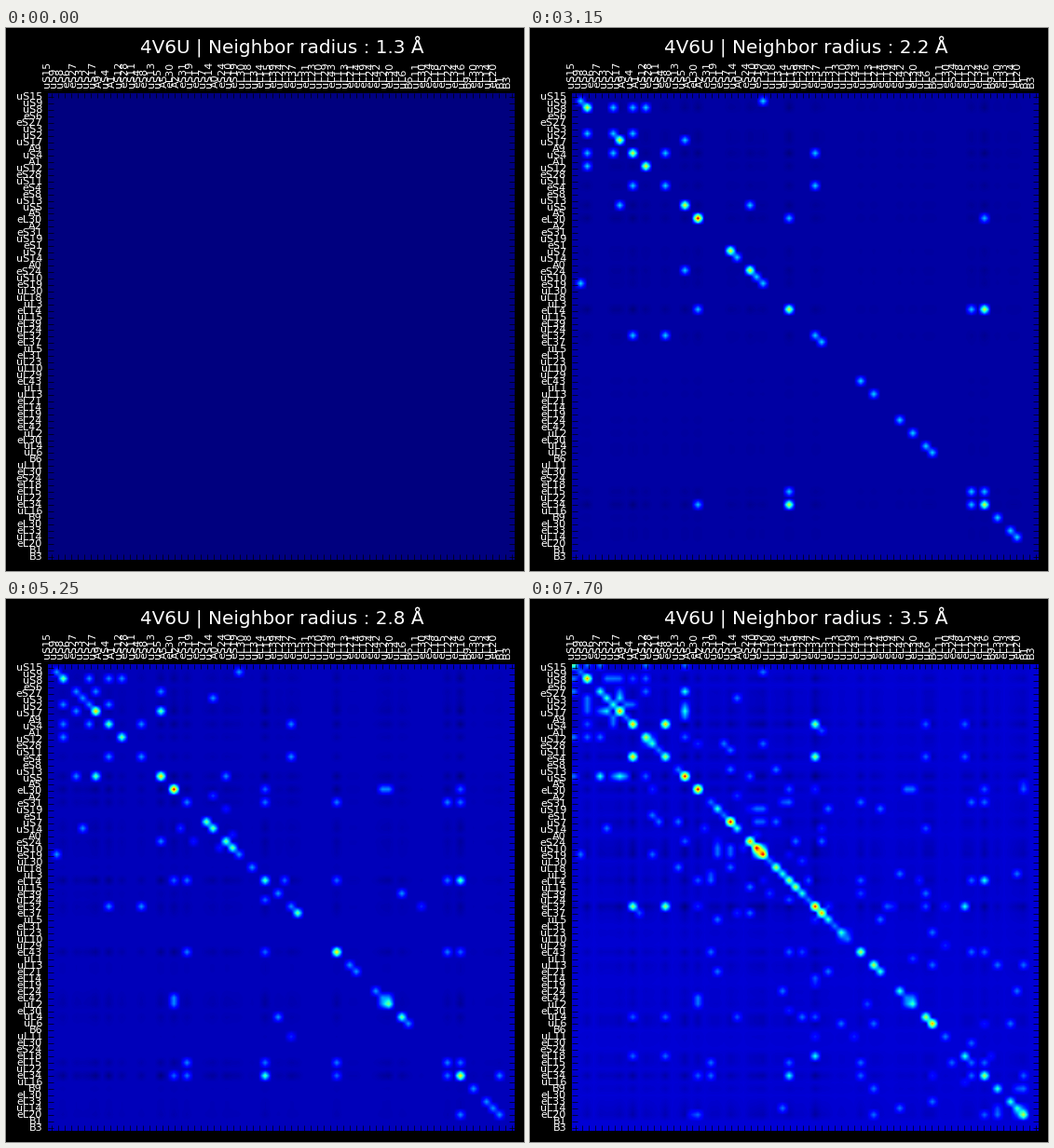
Write a matplotlib script that moves like this. It is 556 px wide and 583 px high and loops after 8000 ms.

```python
import math
import random
import numpy as np
import matplotlib.pyplot as plt
from matplotlib.animation import FuncAnimation

W, H, DPI = 556, 583, 100
LEFT, TOP, SIDE = 45, 70, 501
RIGHT, BOTTOM = LEFT + SIDE, TOP + SIDE
CELL = 6.99
STEPS, HOLD, TICK, LOOP = 23, 350, 50, 8000

plt.rcParams["font.family"] = "DejaVu Sans"

NAMES = """
uS15 uS9 uS8 eS6 eS27 uS3 uS2 uS17 A9 uS4 A1 uS12 eS28 uS11 eS4 eS8 uS13 uS5
A5 eL30 A2 eS31 uS19 eS1 uS7 uS14 A0 eS24 uS10 eS19 uL30 uL18 uL3 eL14 uL15
eL39 uL24 eL32 eL37 uL5 eL31 uL23 uL10 uL29 eL43 uL1 uL13 eL21 eL14 eL19 eL24
eL42 uL2 eL30 uL4 uL6 B6 uL11 eL30 eS24 eL18 eL15 uL22 eL34 uL16 B9 eL30 eL33
uL14 eL20 B1 B3
""".split()
N = len(NAMES)

# Sites where chains meet, by the step of the first contact.
# The other chains of a site join one by one as the radius grows.
SITES = {
    0.9: [19],
    1.8: [(33, 63, 61, 44, 21), 7, 11, 19, 50, 52],
    4.2: [(1, 29), 24, 44, 68],
    5.5: [(2, 6, 9), (14, 37, 9), (17, 7), (27, 17), 24, 55, 65],
    7.5: [(19, 33, 63), (2, 11), 25, 27, 28, 38, 46, 54, 67],
    12.5: [(4, 17, 7), (19, 51, 52), (5, 25), (35, 54), (63, 69),
           28, 31, 38, 44, 47],
    15.2: [(17, 0, 11, 4), (54, 14, 37, 9), (24, 28, 29), (32, 50, 68),
           (46, 69, 65), (17, 6, 8), (2, 5, 7), (12, 23), (12, 29),
           (13, 24), (55, 67), (27, 38), (19, 69), (2, 0), 34, 42, 57],
    18.5: [(60, 37, 14, 9), (60, 37), (34, 27), (41, 55), (46, 55),
           (22, 28, 29), (16, 24, 31), (22, 39, 47), *range(28, 42)],
}


def joint_contacts():
    """Number of shared sites of every pair of chains at every step."""
    shared = np.zeros((STEPS, N, N))
    for start, sites in SITES.items():
        gap = 5.6 / start
        for site in sites:
            chains = np.atleast_1d(site)
            for k, a in enumerate(chains):
                step = math.ceil(start + k * gap)
                shared[step:, a, a] += 1
                for b in chains[:k]:
                    shared[step:, [a, b], [b, a]] += 1
    return shared


def scatter(shared, count=30, seed=4):
    """Faint late contacts, mostly between chains close in the list."""
    rng = random.Random(seed)
    for _ in range(count):
        a = rng.randrange(N - 2)
        b = min(a + 1 + int(rng.expovariate(1 / 12)), N - 3)
        if a != b:
            step = rng.randrange(15, STEPS)
            shared[step:, [a, b], [b, a]] += rng.uniform(0.4, 0.9)


def heat(a, step):
    """Contacts minus the level expected from row and column sums, in 0..1."""
    if not a.any():
        return a
    base = np.interp(step, [0, 5, 6, 14, 16, 22],
                     [0, .011, .028, .04, .066, .075])
    k = a.sum(axis=0)
    expected = np.outer(k, k)
    dip = expected / max(expected[a == 0].max(), 1)
    return base * (1 - np.minimum(dip, 1)) + (1 - base) * a / a.max()


def title(step):
    return f"4V6U | Neighbor radius : {1.3 + 0.1 * step:.1f} Å"


contacts = joint_contacts()
scatter(contacts)
maps = [heat(a, step) for step, a in enumerate(contacts)]

fig = plt.figure(figsize=(W / DPI, H / DPI), dpi=DPI, facecolor="black")
ax = fig.add_axes([LEFT / W, 1 - BOTTOM / H, SIDE / W, SIDE / H])
ax.axis("off")

x0, y0 = LEFT - 1, TOP - 2
image = ax.imshow(maps[0], cmap="jet", vmin=0, vmax=1, aspect="auto",
                  interpolation="bilinear",
                  extent=(x0, x0 + N * CELL, y0 + N * CELL, y0))
ax.set_xlim(LEFT, RIGHT)
ax.set_ylim(BOTTOM, TOP)

mid = 1 + (np.arange(N) + 0.5) * (SIDE - 1) / N
tick_len = 5.5
for start in (0, SIDE - tick_len):
    end = start + tick_len
    ax.vlines(LEFT + mid, TOP + start, TOP + end, color="black", lw=0.5)
    ax.hlines(TOP + mid, LEFT + start, LEFT + end, color="black", lw=0.5)

label = dict(color="white", fontsize=8, ha="right")
for name, m in zip(NAMES, mid):
    ax.text(LEFT - 6, TOP + m, name, va="center", **label)
    ax.text(LEFT + m, TOP - 5.5, name, va="bottom", rotation=90, **label)

heading = ax.text((LEFT + 1 + RIGHT) / 2, 28, title(0), color="white",
                  fontsize=14.4, ha="center", va="baseline")


def update(frame):
    step = min(frame * TICK // HOLD, STEPS - 1)
    image.set_data(maps[step])
    heading.set_text(title(step))
    return image, heading


anim = FuncAnimation(fig, update, frames=LOOP // TICK, interval=TICK,
                     repeat=True, repeat_delay=0)
plt.show()
```
